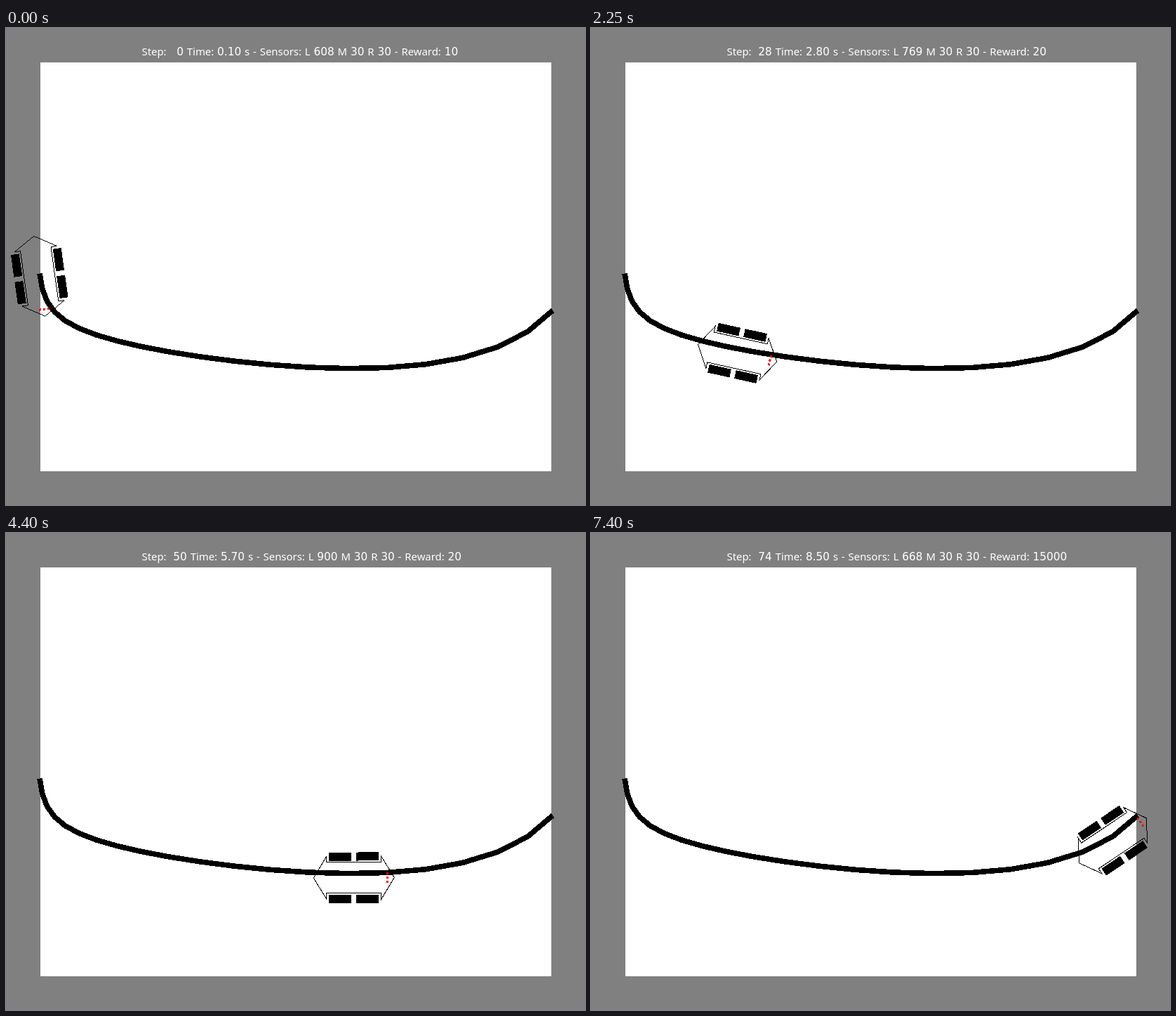
Recreate the animation shown at these times as an HTML page. Size 825 by 679 pixels, loop 7.55 s.

```html
<!DOCTYPE html>
<html lang="en">
<head>
<meta charset="utf-8">
<title>Line follower</title>
<style>
  html, body { margin: 0; width: 100%; height: 100%; overflow: hidden; background: #808080; }
  svg { display: block; }
  text { fill: #fff; white-space: pre; font: 14.9px "Noto Sans", "Open Sans", sans-serif; }
  .num { font: 15.3px "DejaVu Sans", sans-serif; }
</style>
</head>
<body>
<svg width="825" height="679">
  <g shape-rendering="crispEdges">
    <rect x="49" y="49" width="728" height="582" fill="#fff"/>
    <polyline id="track" fill="none" stroke="#000" stroke-width="7.6"/>
    <g id="robot">
      <path fill="none" stroke="#000"
        d="M-57.5 0L-39 -30.5V-22H39V-30.5L57.5 0L39 30.5V22H-39V30.5Z"/>
      <path stroke="#000" stroke-width="12" d="M-35.5 -30.2h32m7 0h32M-35.5 30.2h32m7 0h32"/>
      <path stroke="#f00" stroke-width="3" stroke-dasharray="3" d="M47.5 -7.5v15"/>
    </g>
  </g>
  <text id="caption" x="193.5" y="39"></text>
</svg>
<script>
const [track, robot, caption] = ['track', 'robot', 'caption'].map(id => document.getElementById(id));
const LOOP = 7550, LAST = 74, SEGMENTS = 20;
const SENSOR_X = 47.5, SENSOR_Y = -6;

// Run log: step, start in ms, distance along the line, left sensor, simulated seconds
const log = [
  [0, 0, 0, 608, 0.1],
  [10, 800, 50, 688, 0.9],
  [20, 1700, 115, 900, 1.8],
  [35, 2750, 290, 654, 3.65],
  [50, 4400, 496, 900, 5.7],
  [63, 5950, 656, 782, 7.35],
  [74, 7400, 749, 668, 8.5]
];

function logAt(step) {
  const i = Math.max(1, log.findIndex(row => row[0] >= step));
  const a = log[i - 1], b = log[i];
  const k = (step - a[0]) / (b[0] - a[0]);
  return a.map((v, j) => v + (b[j] - v) * k);
}

function bezier(t) {
  let points = [[48, 349.5], [61, 471], [145.5, 424], [622, 577], [779, 402]];
  while (points.length > 1)
    points = points.slice(1).map(([x, y], i) => {
      const [px, py] = points[i];
      return [px + (x - px) * t, py + (y - py) * t];
    });
  return points[0];
}

// The left sensor rides beside the line and the body is steered behind it.
function simulate() {
  let t = 0.125, point = bezier(t), travelled = 0, heading = 82 * Math.PI / 180, slope = 0.95;
  return Array.from({ length: LAST + 1 }, (_, step) => {
    const [, ms, distance, light, seconds] = logAt(step);
    while (travelled < distance) {
      t += 0.0005;
      const next = bezier(t), dx = next[0] - point[0], dy = next[1] - point[1];
      const ds = Math.hypot(dx, dy);
      slope = Math.atan2(dy, dx);
      heading += Math.sin(slope - heading) * ds / SENSOR_X;
      travelled += ds;
      point = next;
    }
    const offset = 1 + (900 - light) / 100;
    const c = Math.cos(heading), s = Math.sin(heading);
    return {
      start: Math.round(ms / 50) * 50,
      x: point[0] - offset * Math.sin(slope) - SENSOR_X * c + SENSOR_Y * s,
      y: point[1] + offset * Math.cos(slope) - SENSOR_X * s - SENSOR_Y * c,
      angle: heading * 180 / Math.PI,
      left: Math.round(light),
      time: (Math.round(seconds * 20) / 20).toFixed(2)
    };
  });
}

const states = simulate();
const begin = performance.now();
let shown = -1;

track.setAttribute('points', Array.from({ length: SEGMENTS + 1 }, (_, i) => bezier(i / SEGMENTS)).join(' '));

function tick() {
  const t = (performance.now() - begin) % LOOP;
  const step = states.filter(s => s.start <= t).length - 1;
  if (step !== shown) {
    const { x, y, angle, left, time } = states[step];
    const reward = step === LAST ? 15000 : left > 670 ? 20 : 10;
    const text = `Step: ${String(step).padStart(3)} Time: ${time} s - Sensors: L ${left} M 30 R 30 - Reward: ${reward}`;
    robot.setAttribute('transform', `translate(${x} ${y}) rotate(${angle})`);
    caption.innerHTML = text.replace(/[\d. ]+/g, '<tspan class="num">$&</tspan>');
    shown = step;
  }
  requestAnimationFrame(tick);
}
tick();
</script>
</body>
</html>
```
